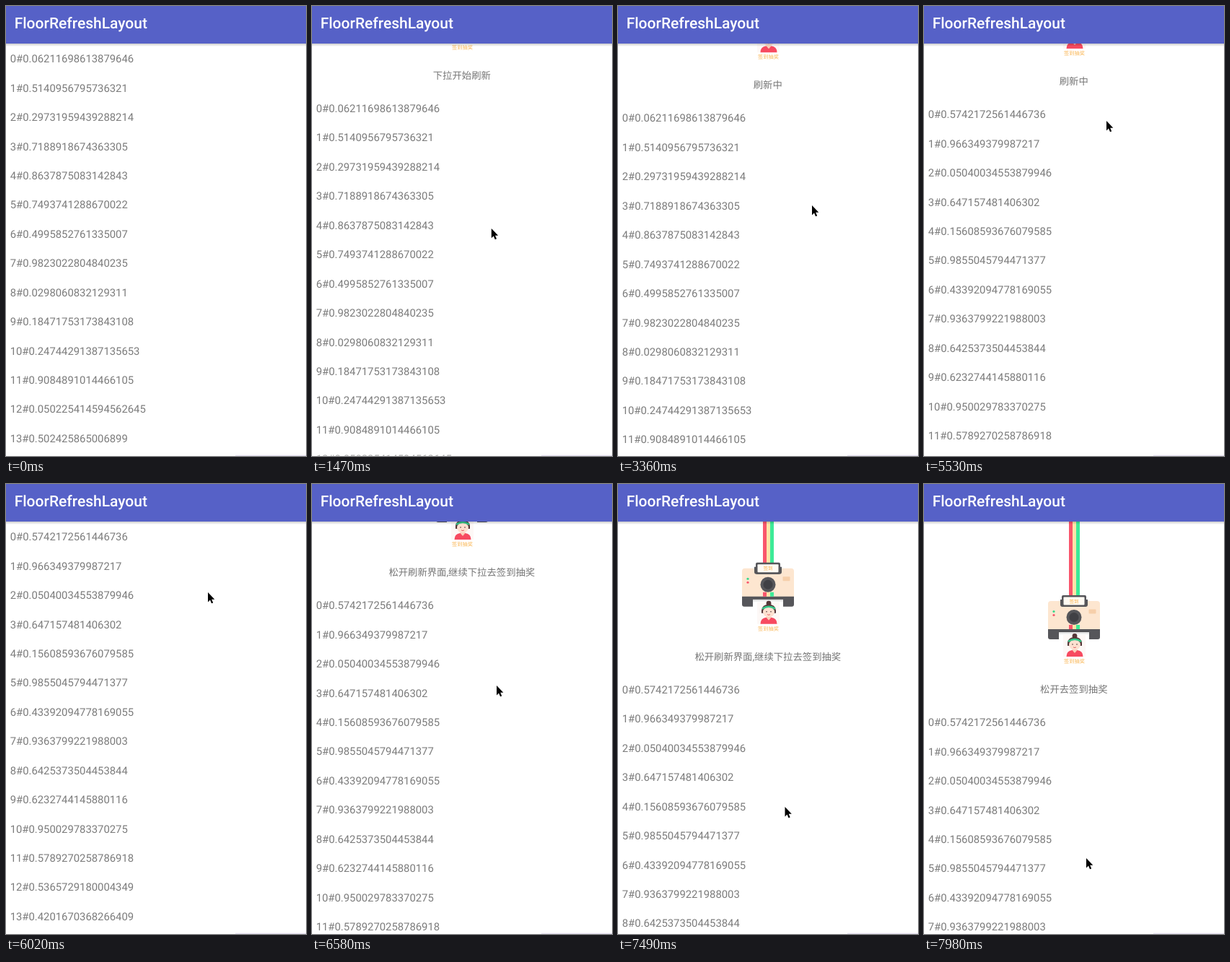
These frames come from a looping animation (416 by 623 pixels, 8 s). An HTML page:

```html
<!DOCTYPE html>
<html lang="zh-CN">
<head>
<meta charset="utf-8">
<style>
  html, body { margin: 0; width: 100%; height: 100%; overflow: hidden; background: #fff; }
  svg { display: block; width: 100%; height: 100%; }
  text { font-family: Roboto, "Noto Sans CJK SC", "Noto Sans CJK", sans-serif; text-rendering: geometricPrecision; }
  #rows text { font-size: 14.83px; fill: #7c7c7c; }
  #label { font-size: 13.35px; fill: #757575; text-anchor: middle; }
  .title { font-size: 21px; font-weight: 500; fill: #fff; }
  .tag { fill: #f9b552; text-anchor: middle; font-weight: 500; }
</style>
</head>
<body>
<svg viewBox="0 0 416 623">
  <defs>
    <linearGradient id="shade" x2="0" y2="1">
      <stop stop-color="#000" stop-opacity=".2"/>
      <stop offset="1" stop-color="#000" stop-opacity="0"/>
    </linearGradient>
  </defs>
  <rect width="416" height="623" fill="#fff"/>

  <g id="content">
    <!-- ribbon -->
    <path d="M201-10h5v180h-5z" fill="#f9566c"/>
    <path d="M206-10h5v180h-5z" fill="#fde5a8"/>
    <path d="M211-10h5v180h-5z" fill="#3deb98"/>

    <!-- camera -->
    <path d="M172 200h72v12q0 3-3 3h-66q-3 0-3-3z" fill="#56565a"/>
    <path d="M187 205h42v11h-42z" fill="#fff"/>
    <path d="M187 204h42v5h-42z" fill="url(#shade)"/>
    <path d="M176 162h64q4 0 4 4v35h-72v-35q0-4 4-4z" fill="#fde6d0"/>
    <path d="M201 195h5v6h-5z" fill="#f9566c"/>
    <path d="M206 195h5v6h-5z" fill="#fde5a8"/>
    <path d="M211 195h5v6h-5z" fill="#3deb98"/>
    <circle cx="208" cy="184.500" r="10.500" fill="#56565a"/>
    <circle cx="208" cy="184.500" r="6.500" fill="#404045"/>
    <circle cx="180" cy="176.500" r="1.6" fill="#35d98b"/>
    <circle cx="180" cy="181.500" r="1.6" fill="#f9566c"/>
    <rect x="228.500" y="173.500" width="10" height="6" rx="1" fill="#f6cfaa"/>
    <path d="M189 160h38v7q0 3-3 3h-32q-3 0-3-3z" fill="#56565a"/>
    <rect x="191" y="154" width="34" height="16" rx="2" fill="#56565a"/>
    <rect x="193.500" y="156.500" width="29" height="11" rx="1" fill="#fffaf3"/>
    <text class="tag" x="208" y="164.600" font-size="6.6">签到</text>

    <!-- photo -->
    <path d="M193 209h31v30h-31z" fill="#fdf8f6"/>
    <circle cx="209" cy="210.500" r="3.400" fill="#553738"/>
    <path d="M199 224v-4q1-8 10-8t10 8v4z" fill="#553738"/>
    <path d="M197.500 239q0-8 8-9h7q8 1 8 9z" fill="#f74a60"/>
    <path d="M205.500 227h7v3l-3.500 4-3.500-4z" fill="#fbcfba"/>
    <ellipse cx="209" cy="222.500" rx="8" ry="7" fill="#fde0d0"/>
    <path d="M200 218q9-6 18 0" fill="none" stroke="#35c98a" stroke-width="2.400"/>
    <g fill="#47302f"><circle cx="206" cy="222" r=".8"/><circle cx="212" cy="222" r=".8"/></g>
    <path d="M207 225.800q2 1.800 4 0" fill="none" stroke="#e0565c" stroke-width=".9"/>
    <text class="tag" x="208.500" y="248.200" font-size="7.200">签到抽奖</text>

    <text id="label" x="207.800" y="289.200"></text>
    <g id="rows"></g>
  </g>

  <path d="M0 618.500h416v4.500h-416z" fill="#fafafa" opacity=".4"/>
  <path d="M318 621.800h98v1.200h-98z" fill="#e4e0f0"/>
  <path d="M0 52h416v4h-416z" fill="url(#shade)"/>
  <path d="M0 0h416v52h-416z" fill="#5661c7"/>
  <text class="title" x="11.700" y="31.200">FloorRefreshLayout</text>

  <path id="cursor" d="M0 0v13.400l3-2.800 2 4.700 2.200-.9-2-4.600h4.100z"
        stroke="#fff" paint-order="stroke"/>
</svg>
<script>
const LOOP = 8000, TICK = 70, FULL_PULL = 257, ROW_GAP = 40.44;

const before = `06211698613879646 5140956795736321 29731959439288214 7188918674363305
  8637875083142843 7493741288670022 4995852761335007 9823022804840235 0298060832129311
  18471753173843108 24744291387135653 9084891014466105 050225414594562645 502425865006899`.split(/\s+/);
const after = `5742172561446736 966349379987217 05040034553879946 647157481406302
  15608593676079585 9855045794471377 43392094778169055 9363799221988003 6425373504453844
  6232744145880116 950029783370275 5789270258786918`.split(/\s+/);
const randomDigits = seed => Math.abs(Math.sin(seed)).toFixed(16).slice(2);

const linear = k => k;
const smooth = k => k * k * (3 - 2 * k);
const easeIn = k => k * k;
const easeOut = power => k => 1 - (1 - k) ** power;

// Each gesture moves the pointer and/or the list, which then rest until the next one.
const start = { pull: 0, x: 375, y: 575 };
const gestures = [
  [140, 280, linear, { x: 280, y: 287 }],
  [420, 700, smooth, { x: 253, y: 218 }],
  [1120, 1890, easeOut(2), { pull: 98, x: 247, y: 346 }],
  [1890, 2100, smooth, { pull: 89, x: 258, y: 336 }],
  [2940, 3500, easeIn, { pull: 77 }],
  [2940, 3360, smooth, { x: 269, y: 276 }],
  [4060, 4340, smooth, { x: 307, y: 190 }],
  [4550, 4900, smooth, { x: 253, y: 159 }],
  [5530, 6020, smooth, { pull: 0, x: 280, y: 150 }],
  [6160, 7000, easeOut(1.22), { pull: 166.5, x: 238, y: 376 }],
  [7000, 7980, linear, { pull: FULL_PULL, x: 225, y: 518 }],
];

function poseAt(time) {
  const pose = { ...start };
  for (const [from, to, ease, goal] of gestures) {
    const k = ease(Math.min(1, Math.max(0, (time - from) / (to - from))));
    for (const part in goal) pose[part] += (goal[part] - pose[part]) * k;
  }
  return pose;
}

function labelFor(time, pull) {
  if (time >= 3010 && time < 6090) return "刷新中";
  if (pull < 78) return "下拉开始刷新";
  return pull < 247 ? "松开刷新界面,继续下拉去签到抽奖" : "松开去签到抽奖";
}

const byId = id => document.getElementById(id);
const content = byId("content"), label = byId("label"), cursor = byId("cursor");
const rows = before.map((_, i) => {
  const row = document.createElementNS("http://www.w3.org/2000/svg", "text");
  row.setAttribute("x", 5.7);
  row.setAttribute("y", 78.2 + FULL_PULL + i * ROW_GAP);
  return byId("rows").appendChild(row);
});

function draw() {
  const time = Math.floor(performance.now() % LOOP / TICK) * TICK;
  const { pull, x, y } = poseAt(time);
  const data = time < 3640 ? before : after;
  content.setAttribute("transform", `translate(0 ${pull - FULL_PULL})`);
  label.textContent = labelFor(time, pull);
  rows.forEach((row, i) => row.textContent = `${i}#0.${data[i] ?? randomDigits(i)}`);
  cursor.setAttribute("transform", `translate(${x} ${y})`);
  cursor.style.display = time < 140 ? "none" : "";
  requestAnimationFrame(draw);
}
draw();
</script>
</body>
</html>
```
